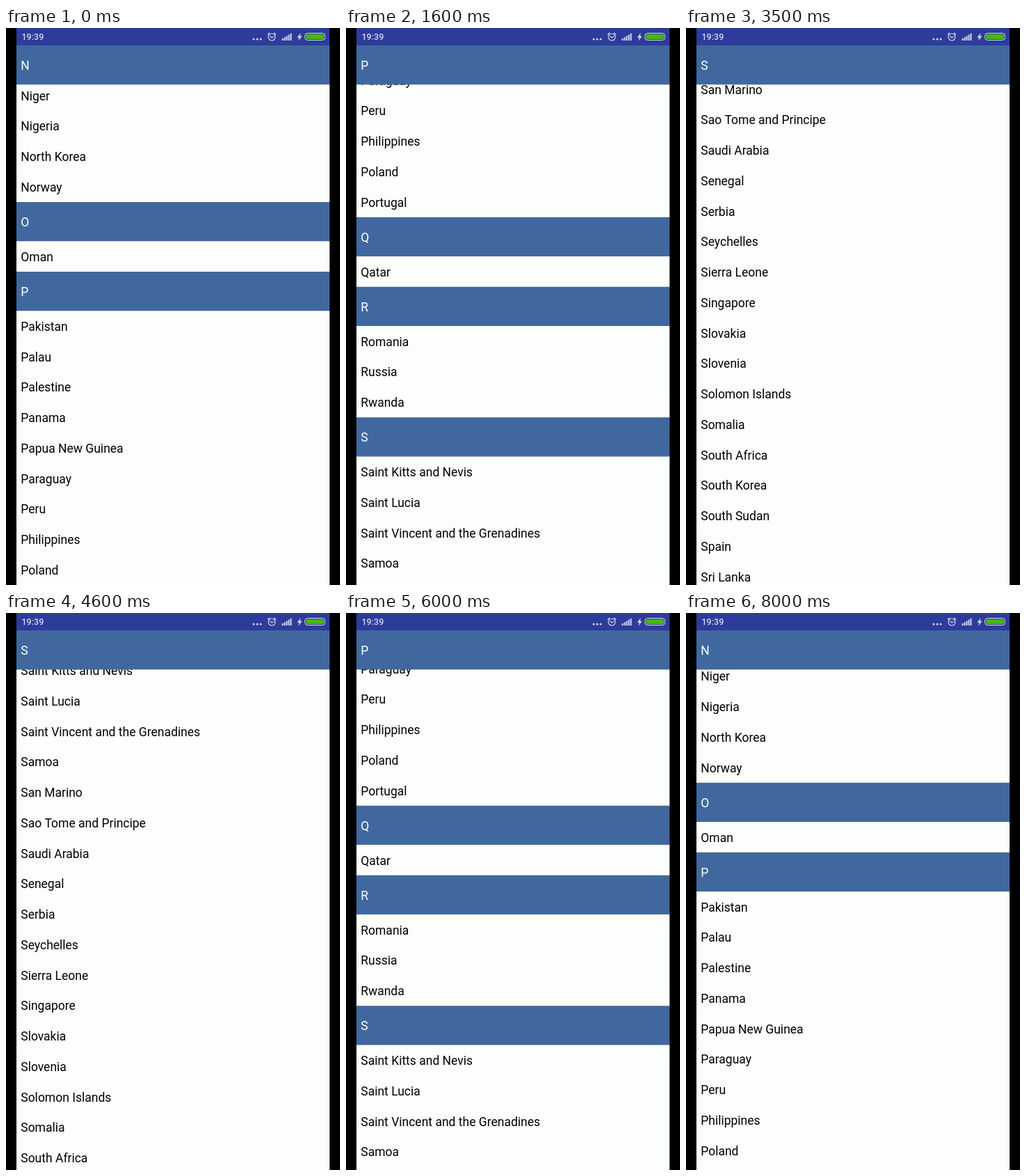
Recreate the animation shown at these times as an HTML page with a canvas. Size 480 by 800 pixels, loop 9000 ms.

```html
<!DOCTYPE html>
<html lang="en">
<head>
<meta charset="utf-8">
<title>Country list</title>
<style>
  html, body { margin: 0; width: 100%; height: 100%; overflow: hidden; background: #000; }
  canvas { display: block; }
</style>
</head>
<body>
<canvas id="stage" width="480" height="800"></canvas>
<script>
const ctx = document.getElementById('stage').getContext('2d');

const LEFT = 15, WIDTH = 450, TOP = 25, HEIGHT = 800;
const ROW = 43.75, HEADER = 56.25, TEXT_X = 21.25;
const LOOP = 9000, STEP = 100;
const SPEED = 0.4;                 // px per ms
const END = 1306.25, HOME = 6.25;  // resting scroll offsets

const countries = {
  N: 'Nicaragua,Niger,Nigeria,North Korea,Norway',
  O: 'Oman',
  P: 'Pakistan,Palau,Palestine,Panama,Papua New Guinea,Paraguay,Peru,Philippines,Poland,Portugal',
  Q: 'Qatar',
  R: 'Romania,Russia,Rwanda',
  S: 'Saint Kitts and Nevis,Saint Lucia,Saint Vincent and the Grenadines,Samoa,San Marino,' +
     'Sao Tome and Principe,Saudi Arabia,Senegal,Serbia,Seychelles,Sierra Leone,Singapore,' +
     'Slovakia,Slovenia,Solomon Islands,Somalia,South Africa,South Korea,South Sudan,Spain,Sri Lanka'
};

let nextTop = TOP - 50;
const sections = Object.entries(countries).map(([letter, list]) => {
  const names = list.split(',');
  const top = nextTop;
  nextTop += HEADER + names.length * ROW;
  return { letter, names, top, bottom: nextTop };
});

// Constant speed, then a quadratic slow-down over the last row.
function travelled(elapsed, distance) {
  const cruise = (distance - ROW) / SPEED;
  if (elapsed <= cruise) return Math.max(0, elapsed * SPEED);
  const p = Math.min(1, (elapsed - cruise) * SPEED * 0.3356 / ROW);
  return distance - ROW * (1 - p) ** 2;
}

function scrollAt(time) {
  return time < 4000
    ? travelled(time - 170, END)
    : END - travelled(time - 4152, END - HOME);
}

function label(text, top, height, color) {
  ctx.fillStyle = color;
  ctx.fillText(text, TEXT_X, top + height / 2 + 6.87);
}

function drawList(scroll) {
  ctx.fillStyle = '#fdfffc';
  ctx.fillRect(LEFT, TOP, WIDTH, HEIGHT - TOP);
  ctx.font = '17.5px Roboto, sans-serif';

  for (const { names, top } of sections) {
    names.forEach((name, i) => {
      const y = top + HEADER + i * ROW - scroll;
      if (y > TOP - ROW && y < HEIGHT) label(name, y, ROW, '#000');
    });
  }
  // Headers stick to the top until the next section pushes them away.
  for (const { letter, top, bottom } of sections) {
    const y = Math.min(Math.max(TOP, top - scroll), bottom - scroll - HEADER);
    if (y < TOP - HEADER || y > HEIGHT) continue;
    ctx.fillStyle = '#40689e';
    ctx.fillRect(LEFT, y, WIDTH, HEADER);
    label(letter, y, HEADER, '#fff');
  }
}

function drawStatusBar() {
  ctx.fillStyle = '#2d3c9b';
  ctx.fillRect(LEFT, 0, WIDTH, TOP);
  ctx.fillStyle = ctx.strokeStyle = '#d5d9f0';
  ctx.font = '500 12.5px Roboto, sans-serif';
  ctx.fillText('19:39', 22.5, 17);

  for (let i = 0; i < 3; i++) {
    ctx.beginPath();
    ctx.arc(356 + i * 5, 16, 1.5, 0, 7);
    ctx.fill();
  }

  ctx.lineWidth = 1.2;
  ctx.beginPath();
  ctx.arc(382, 13, 5, 0, 7);
  ctx.stroke();
  ctx.stroke(new Path2D('M376 9.5l3-2.7M388 9.5l-3-2.7M379.5 11.5l2.5 2.5 3-2'));

  for (let i = 0; i < 5; i++) {
    const h = 3 + i * 1.8;
    ctx.fillRect(396.5 + i * 3, 18 - h, 2, h);
  }

  ctx.fill(new Path2D('M423.5 7l-5 6.7h3l-1.5 5 5.5-7h-3z'));

  ctx.lineWidth = 1;
  ctx.beginPath();
  ctx.roundRect(429.5, 7.5, 29, 10, 4);
  ctx.stroke();
  ctx.fillStyle = '#46b80e';
  ctx.beginPath();
  ctx.roundRect(431, 9, 26, 7, 2.5);
  ctx.fill();
}

function frame() {
  const time = Math.floor(performance.now() % LOOP / STEP) * STEP;
  ctx.fillStyle = '#000';
  ctx.fillRect(0, 0, 480, HEIGHT);
  drawList(scrollAt(time));
  drawStatusBar();
  requestAnimationFrame(frame);
}
frame();
</script>
</body>
</html>
```
